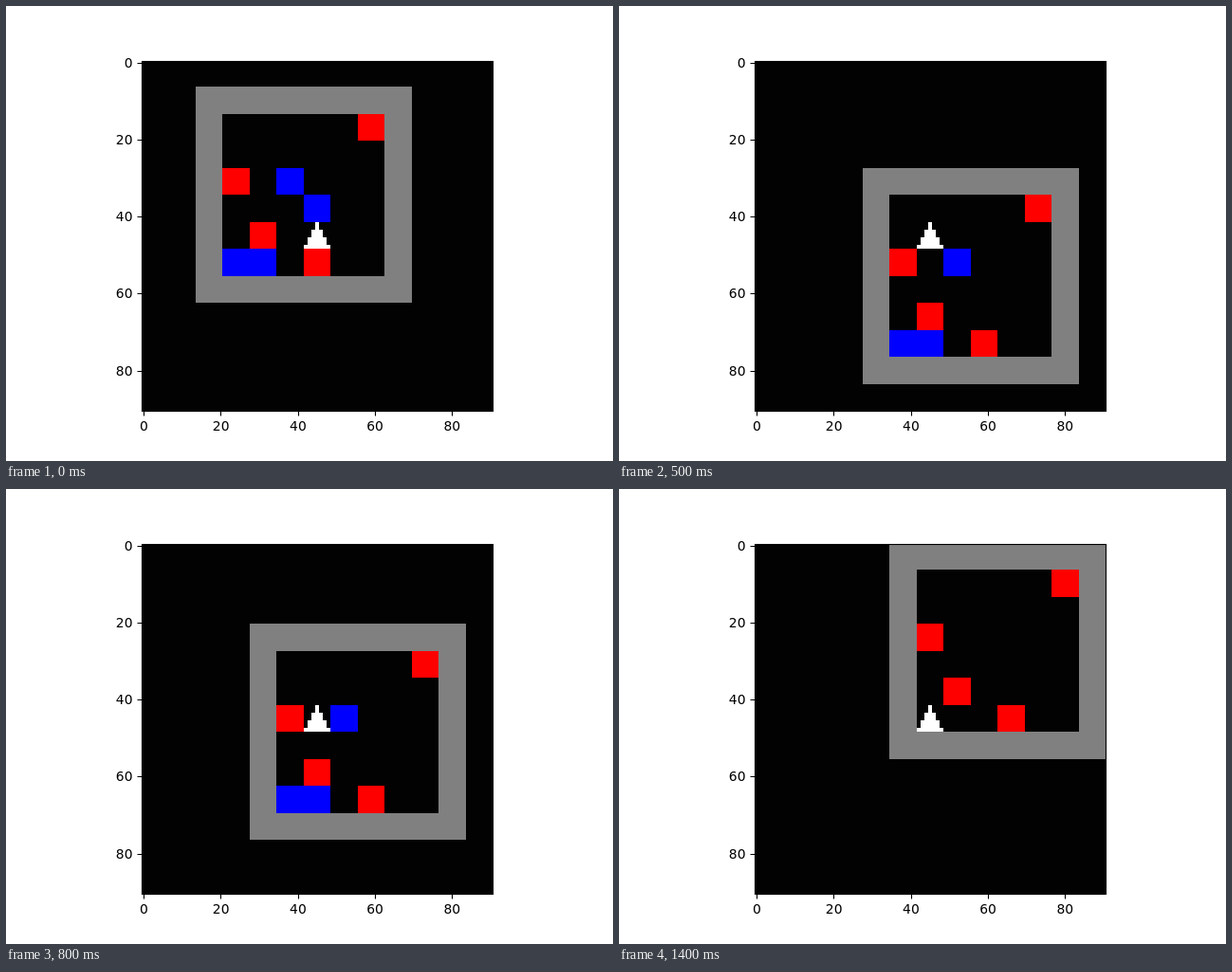
These frames come from a looping animation (640x480 px, 1.5 s). An HTML page:

```html
<!DOCTYPE html>
<html lang="en">
<head>
<meta charset="utf-8">
<title>Grid world</title>
<style>
  html, body { margin: 0; width: 100%; height: 100%; overflow: hidden; background: #fff; }
  svg { display: block; width: 640px; height: 480px; }
  text { font: 13.889px "DejaVu Sans", sans-serif; }
</style>
</head>
<body>
<svg viewBox="0 0 640 480">
  <rect x="143" y="58" width="371" height="370" fill="#020202"/>
  <path id="wall" fill="#808080" fill-rule="evenodd"/>
  <path id="red" fill="#f00"/>
  <path id="blue" fill="#00f"/>
  <path id="agent" fill="#fff"/>
  <g id="axes" stroke="#000" stroke-width="1.11" fill="none">
    <rect x="143.5" y="58.5" width="370" height="369"/>
  </g>
  <g id="labels"></g>
</svg>
<script>
const STEP_MS = 100, CELL = 7, SIZE = 91, CENTER = 6;
const el = id => document.getElementById(id);

// Pixel edges of the 91 x 91 image on the stage
const edgeX = p => Math.round(143 + 370 * p / SIZE);
const edgeY = p => Math.max(58, Math.round(57 + 370 * p / SIZE));
const box = (x, y, w, h) =>
  `M${edgeX(x)} ${edgeY(y)}H${edgeX(x + w)}V${edgeY(y + h)}H${edgeX(x)}Z`;
const cells = (x, y, n = 1) => box(x * CELL, y * CELL, n * CELL, n * CELL);

// Room coordinates; the walls fill columns and rows 0 and 7
const reds = [[6, 1], [1, 3], [2, 5], [4, 6]];
const blues = [[3, 3], [4, 4], [1, 6], [2, 6]];
const moves = { U: [0, -1], D: [0, 1], L: [-1, 0], R: [1, 0] };
const route = [[4, 5]];
for (const m of "ULLUURLDRDDDLL") {
  const [x, y] = route.at(-1), [dx, dy] = moves[m];
  route.push([x + dx, y + dy]);
}

let agentPath = "";
for (let row = 0; row < CELL; row++) {
  const half = row >> 1;
  agentPath += box(CENTER * CELL + 3 - half, CENTER * CELL + row, 2 * half + 1, 1);
}
el("agent").setAttribute("d", agentPath);

let ticks = "", labels = "";
for (let v = 0; v <= 80; v += 20) {
  const offset = (v + 0.5) * 369.6 / SIZE;
  const x = Math.round(143.2 + offset), y = Math.round(57.6 + offset);
  ticks += `M${x + 0.5} 428V432.5M143 ${y + 0.5}H138.5`;
  labels += `<text x="${143.4 + offset}" y="448" text-anchor="middle">${v}</text>` +
            `<text x="133.5" y="${y + 5}" text-anchor="end">${v}</text>`;
}
el("axes").innerHTML += `<path d="${ticks}"/>`;
el("labels").innerHTML = labels;

// The view stays centred on the agent, so the room moves around it
function draw(now) {
  const step = Math.floor(now / STEP_MS) % route.length;
  const [ax, ay] = route[step];
  const ox = CENTER - ax, oy = CENTER - ay;
  const eaten = ([x, y]) => route.slice(0, step + 1).some(p => p[0] === x && p[1] === y);
  const squares = list => list.map(([x, y]) => cells(ox + x, oy + y)).join("");

  el("wall").setAttribute("d", cells(ox, oy, 8) + cells(ox + 1, oy + 1, 6));
  el("red").setAttribute("d", squares(reds));
  el("blue").setAttribute("d", squares(blues.filter(b => !eaten(b))));
  requestAnimationFrame(draw);
}
draw(performance.now());
</script>
</body>
</html>
```
